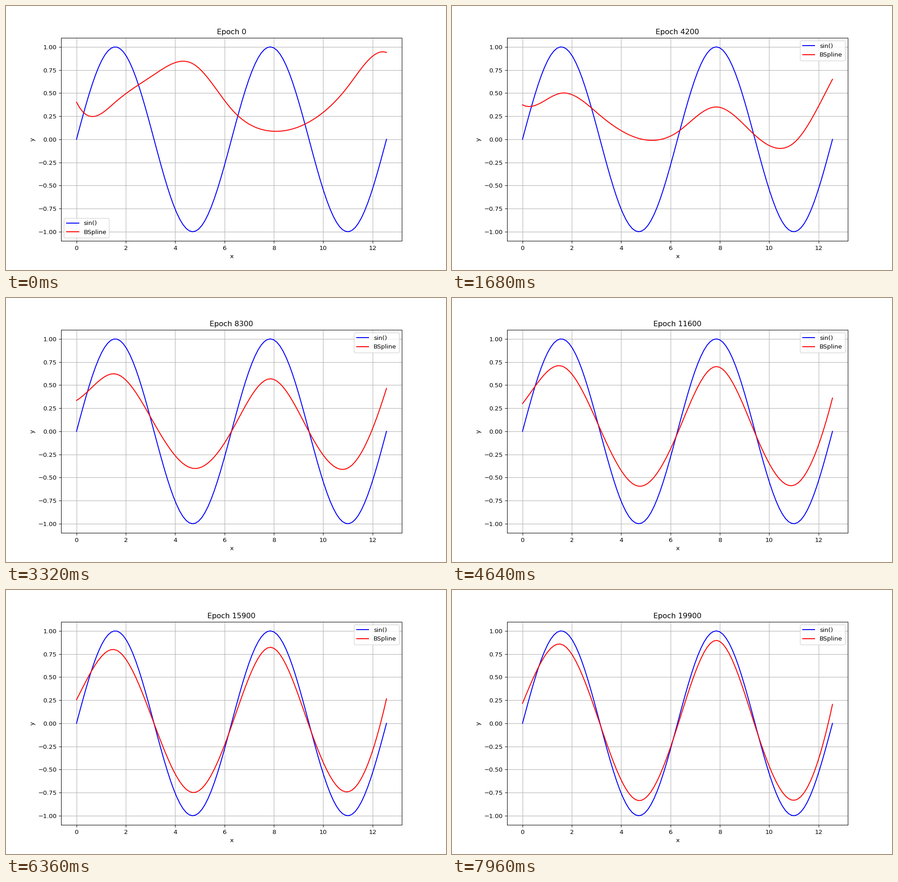
These frames come from a looping animation (966 by 580 pixels, 8 s). A matplotlib script:

```python
import numpy as np
import matplotlib.pyplot as plt
from matplotlib.animation import FuncAnimation

FRAMES, INTERVAL, EPOCHS_PER_FRAME = 200, 40, 100
SPAN = 4 * np.pi
DEGREE, RATE = 3, 1e-3

x = np.linspace(0, SPAN, 100)
target = np.sin(x)
start = np.array([.402, .121, .44, .69, .998, .23, .041, .144, .508, .994, .94])


def basis(pos, count, degree):
    """Clamped B-spline basis (Cox-de Boor), one column per control point."""
    inner = np.linspace(0, SPAN, count - degree + 1)
    knots = np.r_[[0] * degree, inner, [SPAN] * degree]
    p = np.clip(pos, 0, SPAN - 1e-9)[:, None]
    b = ((knots[:-1] <= p) & (p < knots[1:])).astype(float)
    for d in range(1, degree + 1):
        gap = knots[d:] - knots[:-d]
        inv = np.divide(1, gap, out=np.zeros_like(gap), where=gap > 0)
        b = ((p - knots[:-d - 1]) * inv[:-1] * b[:, :-1]
             + (knots[d + 1:] - p) * inv[1:] * b[:, 1:])
    return b


def train():
    """Gradient descent on the mean squared error; one curve per frame."""
    b = basis(x, len(start), DEGREE)
    hessian = 2 / len(x) * b.T @ b
    pull = 2 / len(x) * b.T @ target
    control = start.copy()
    curves = []
    for epoch in range(FRAMES * EPOCHS_PER_FRAME):
        if epoch % EPOCHS_PER_FRAME == 0:
            curves.append(b @ control)
        control -= RATE * (hessian @ control - pull)
    return curves


curves = train()

fig, ax = plt.subplots(figsize=(10, 6.0045), dpi=96.6)
ax.plot(x, target, "b-", label="sin()")
line, = ax.plot(x, curves[0], "r-", label="BSpline")
ax.set_xlim(-SPAN / 20, SPAN * 1.05)
ax.set_ylim(-1.1, 1.1)
ax.set_xlabel("x")
ax.set_ylabel("y")
ax.grid(True)
ax.legend(loc="best")
title = ax.set_title("Epoch 0")


def update(frame):
    line.set_ydata(curves[frame])
    title.set_text(f"Epoch {frame * EPOCHS_PER_FRAME}")
    return line, title


anim = FuncAnimation(fig, update, frames=FRAMES, interval=INTERVAL,
                     repeat=True, repeat_delay=0, blit=False)
plt.show()
```
